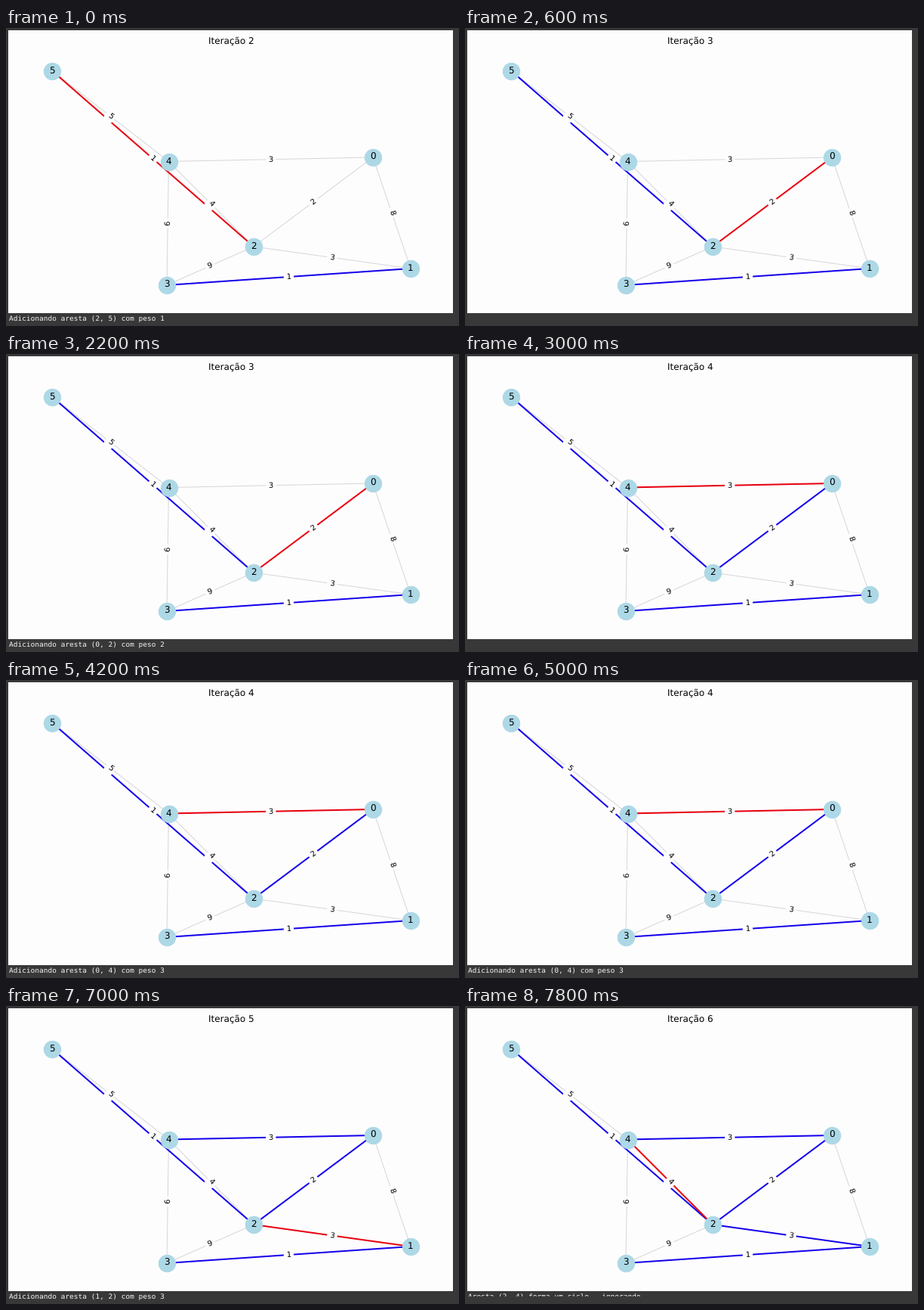
A matplotlib script for the animation above (8 s loop, 600 by 394 pixels).

```python
import math

import matplotlib.pyplot as plt
from matplotlib.animation import FuncAnimation
from matplotlib.patches import Rectangle

plt.rcParams["font.family"] = "DejaVu Sans"
plt.rcParams["text.hinting"] = "none"

W, H, DPI = 600, 394, 72
FRAMES, INTERVAL = 40, 200
DARK, PAPER, GRAY = "#383838", "#fefdfe", "#d6d6d8"
RED, BLUE = "#e8000f", "#1400ec"

NODES = {
    0: (486, 171), 1: (536, 318), 2: (328, 289),
    3: (213, 340), 4: (215.5, 176.5), 5: (61, 56.5),
}
# Sorted by weight, the order in which Kruskal visits them
EDGES = [
    (1, 3, 1), (2, 5, 1), (0, 2, 2), (0, 4, 3), (1, 2, 3),
    (2, 4, 4), (4, 5, 5), (3, 4, 6), (0, 1, 8), (2, 3, 9),
]

FIRST_STEP = 2      # iteration on screen at the start
FIRST_SWITCH = 2    # frame of the first switch
STEP_FRAMES = 12
BLANK_FRAMES = 2    # console stays empty after a switch
CYCLE_STEP = 6      # this edge closes a cycle

fig = plt.figure(figsize=(W / DPI, H / DPI), dpi=DPI, facecolor=DARK)
ax = fig.add_axes([0, 0, 1, 1])
ax.set_xlim(0, W)
ax.set_ylim(H, 0)
ax.axis("off")
ax.add_patch(Rectangle((3, 3), 589.3, 374, fc=PAPER, lw=0, zorder=0))


def edge_line(a, b, **style):
    (xa, ya), (xb, yb) = NODES[a], NODES[b]
    return ax.plot([xa, xb], [ya, yb], **style)[0]


def edge_label(a, b, weight):
    (xa, ya), (xb, yb) = NODES[a], NODES[b]
    angle = math.degrees(math.atan2(ya - yb, xb - xa))
    if angle > 90:
        angle -= 180
    elif angle < -90:
        angle += 180
    ax.text((xa + xb) / 2, (ya + yb) / 2, str(weight), size=10,
            ha="center", va="center", rotation=angle, zorder=4,
            bbox=dict(boxstyle="round", ec=PAPER, fc=PAPER))


marks = []
for a, b, weight in EDGES:
    edge_line(a, b, color=GRAY, lw=1, zorder=1)
    marks.append(edge_line(a, b, lw=2, zorder=2))
    edge_label(a, b, weight)

for name, (x, y) in NODES.items():
    ax.scatter(x, y, s=500, color="#add8e6", lw=1, zorder=3)
    ax.text(x, y, str(name), size=12, ha="center", va="center", zorder=5)

title = ax.text(298.5, 20.5, "", size=12, ha="center", va="baseline")
console = ax.text(3.8, 387.4, "", size=9.48, color="#f4f4f4",
                  family="DejaVu Sans Mono", va="baseline")
cover = ax.add_patch(Rectangle((0, 384.2), W, 10, fc=DARK, lw=0, zorder=6))


def message(step):
    a, b, weight = EDGES[step - 1]
    if step == CYCLE_STEP:
        return f"Aresta ({a}, {b}) forma um ciclo - ignorando"
    return f"Adicionando aresta ({a}, {b}) com peso {weight}"


def update(frame):
    passed, age = divmod(frame - FIRST_SWITCH + STEP_FRAMES, STEP_FRAMES)
    step = FIRST_STEP + passed
    wait = 1 if step == CYCLE_STEP else BLANK_FRAMES

    title.set_text(f"Iteração {step}")
    for i, mark in enumerate(marks, 1):
        mark.set_visible(i <= step)
        mark.set_color(RED if i == step else BLUE)
    console.set_text(message(step) if age >= wait else "")
    # The output area has not grown yet when the last line arrives
    cover.set_visible(step == CYCLE_STEP)
    return [title, console, cover, *marks]


anim = FuncAnimation(fig, update, frames=FRAMES, interval=INTERVAL,
                     repeat=True, blit=False)
plt.show()
```
